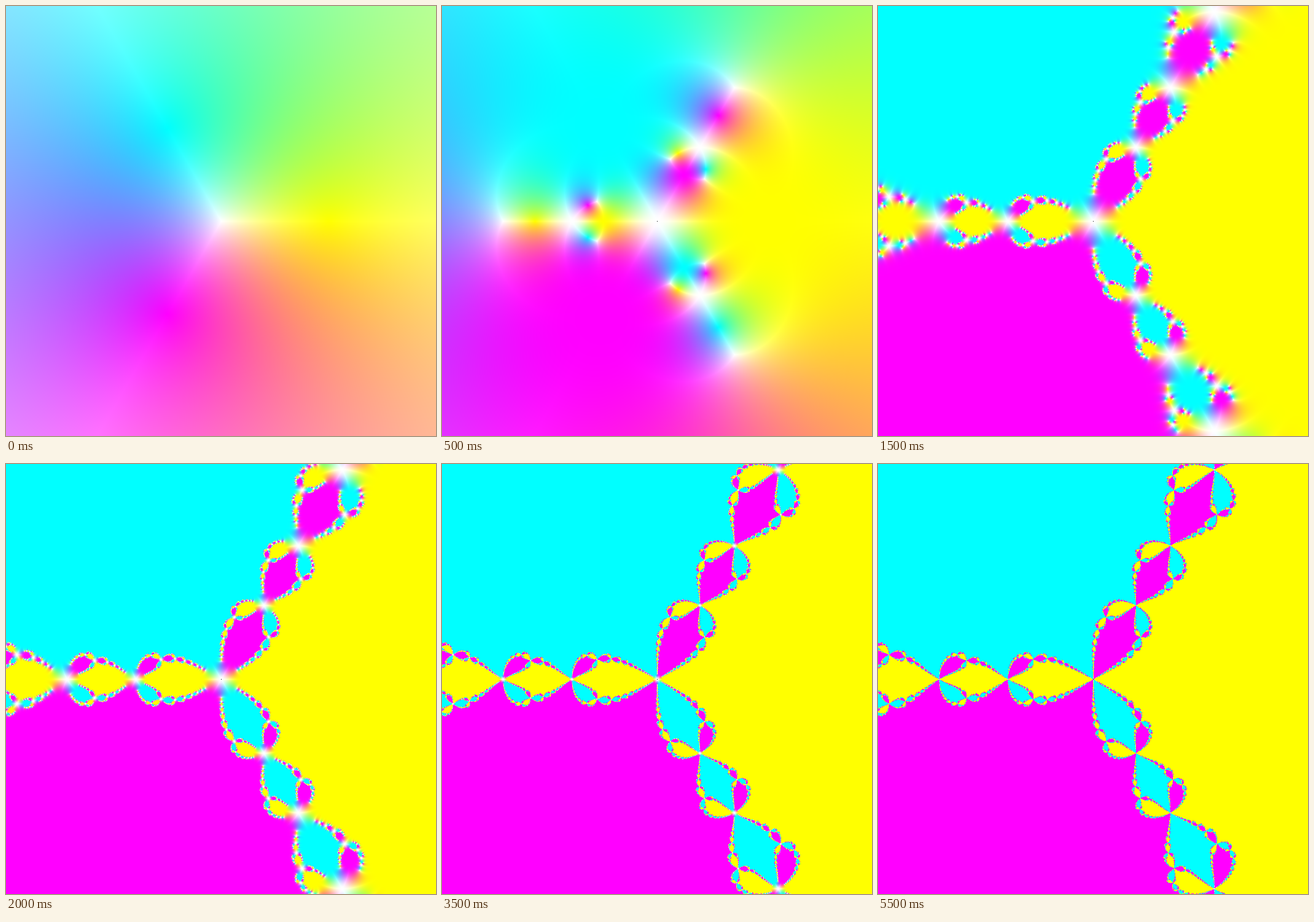
Write an HTML page with a canvas that moves like this. It is 700 px wide and 700 px high and loops after 5.75 s.

```html
<!DOCTYPE html>
<html lang="en">
<head>
<meta charset="utf-8">
<title>Newton's method for z³ = 1</title>
<style>
  html, body { margin: 0; width: 100%; height: 100%; overflow: hidden; }
  canvas { display: block; width: 700px; height: 700px; }
</style>
</head>
<body>
<canvas id="stage" width="700" height="700"></canvas>
<script>
const SIZE = 700, HALF = SIZE / 2, UNIT = 175;
const STEP_MS = 250, STEPS = 23;
const H = Math.sqrt(3) / 2;

const ctx = document.getElementById('stage').getContext('2d');
const image = ctx.createImageData(SIZE, SIZE);
const re = new Float64Array(SIZE * SIZE);
const im = new Float64Array(SIZE * SIZE);
let step = -1;

function reset() {
  for (let i = 0; i < re.length; i++) {
    re[i] = (i % SIZE - HALF) / UNIT;
    im[i] = (HALF - Math.floor(i / SIZE)) / UNIT;
  }
  step = 0;
}

// z -> (2z + 1/z²) / 3; the point z = 0 becomes NaN and is drawn black
function iterate() {
  for (let i = 0; i < re.length; i++) {
    const x = re[i], y = im[i];
    const a = x * x - y * y, b = 2 * x * y, m = a * a + b * b;
    re[i] = (2 * x + a / m) / 3;
    im[i] = (2 * y - b / m) / 3;
  }
  step++;
}

function distance(x, y) {
  return Math.sqrt(x * x + y * y);
}

// Each channel is the distance to one root, relative to the farthest root
function paint() {
  const px = image.data;
  for (let i = 0, p = 0; i < re.length; i++, p += 4) {
    const x = re[i], y = im[i];
    const r = distance(x + 0.5, y - H);
    const g = distance(x + 0.5, y + H);
    const b = distance(x - 1, y);
    const k = 255 / Math.max(r, g, b);
    px[p] = r * k;
    px[p + 1] = g * k;
    px[p + 2] = b * k;
    px[p + 3] = 255;
  }
  ctx.putImageData(image, 0, 0);
}

function show(target) {
  if (target === step) return;
  if (step < 0 || target < step) reset();
  while (step < target) iterate();
  paint();
}

const start = performance.now();
function tick() {
  show(Math.floor((performance.now() - start) / STEP_MS) % STEPS);
  requestAnimationFrame(tick);
}
tick();
</script>
</body>
</html>
```
